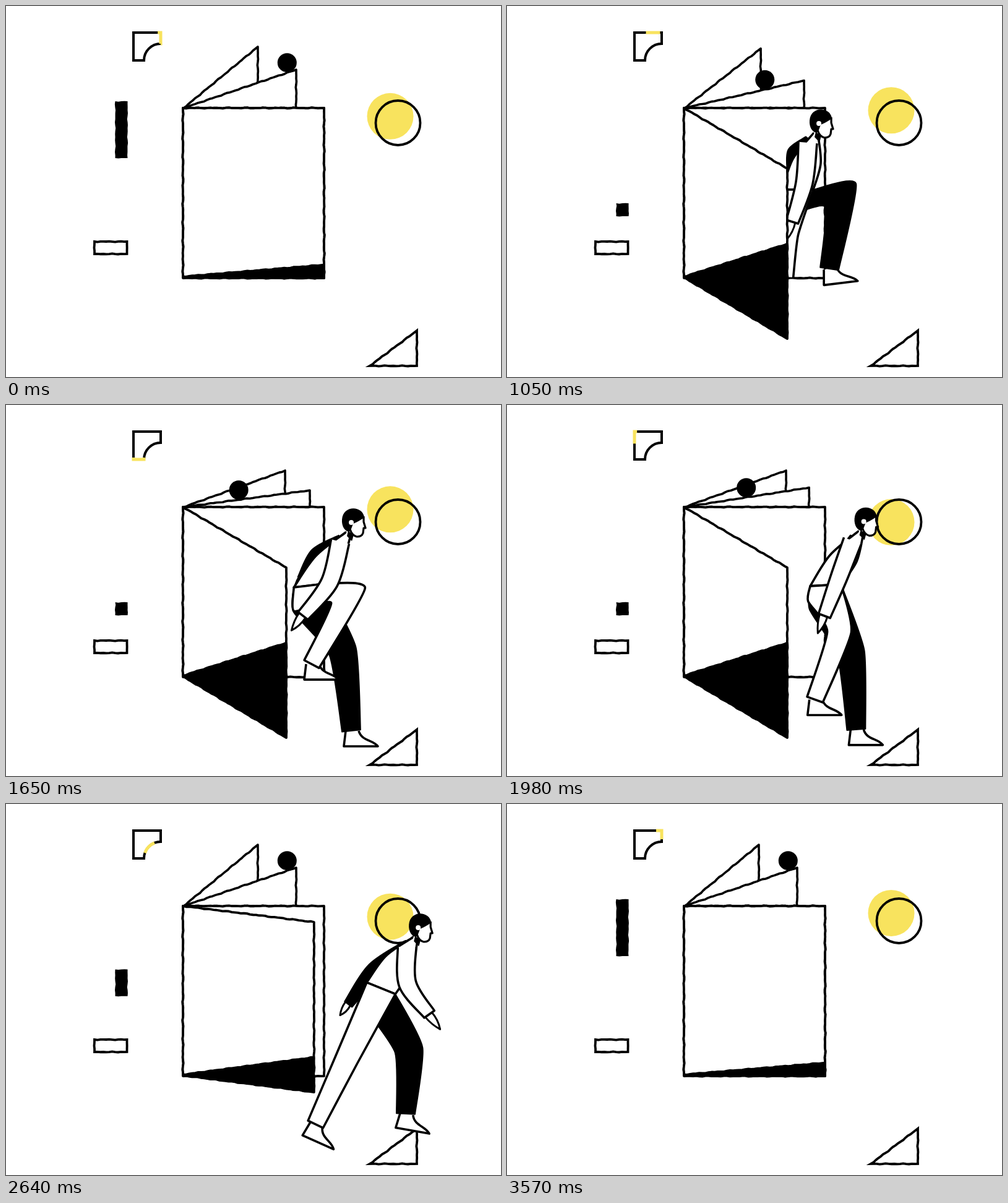
Write an HTML page with a canvas that moves like this. It is 800 px wide and 600 px high and loops after 3600 ms.

```html
<!DOCTYPE html>
<html lang="en">
<head>
<meta charset="utf-8">
<title>Stepping out of a book</title>
<style>
html, body { margin: 0; width: 100%; height: 100%; overflow: hidden; background: #fff; }
canvas { display: block; width: 800px; height: 600px; }
</style>
</head>
<body>
<canvas id="stage" width="800" height="600"></canvas>
<script>
const LOOP = 3600, INK = '#000', PAPER = '#fff', SUN = '#f8e35e', SILL = 441;
const ctx = document.getElementById('stage').getContext('2d');

// Joints of the walker; the near leg is white, the far leg black.
const behindDoor = { hip: [470, 297], nearKnee: [452, 368], nearAnkle: [449, 440] };
const poses = [
  { t: 570, ...behindDoor, neck: [513, 211], nearWrist: [463, 347], nearBend: -5,
    farWrist: [505, 297], farBend: 40, farKnee: [470, 370], farAnkle: [474, 440] },
  { t: 1050, ...behindDoor, neck: [499, 209], nearWrist: [461, 349], nearBend: -7,
    farWrist: [460, 268], farKnee: [539, 306], farAnkle: [521, 425], farPitch: -7 },
  { t: 1650, neck: [553, 209], hip: [490, 292], tilt: -7, nearWrist: [480, 341], nearBend: -14,
    farWrist: [478, 282], nearKnee: [553, 308], nearAnkle: [494, 419],
    farKnee: [544, 398], farAnkle: [558, 527] },
  { t: 2280, neck: [588, 206], hip: [537, 291], nearWrist: [542, 341], nearBend: 12,
    farWrist: [572, 335], nearKnee: [523, 419], nearAnkle: [501, 527],
    farKnee: [566, 404], farAnkle: [570, 523] },
  { t: 2640, neck: [661, 219], hip: [606, 298], tilt: 22, nearWrist: [684, 340], nearBend: 18,
    farWrist: [553, 324], nearKnee: [551, 411], nearAnkle: [500, 518], nearPitch: 24,
    farKnee: [651, 398], farAnkle: [646, 501], farPitch: 10 },
  { t: 2940, neck: [772, 214], hip: [720, 300], tilt: 8, nearWrist: [784, 338], nearBend: 18,
    farWrist: [674, 304], nearKnee: [760, 392], nearAnkle: [702, 488], nearPitch: 15,
    farKnee: [685, 410], farAnkle: [655, 504], farPitch: 5 }
].map(p => ({ tilt: 0, farBend: 8, nearPitch: 0, farPitch: 0, ...p }));

const add = (p, x, y) => [p[0] + x, p[1] + y];
const mix = (a, b, u) => Array.isArray(a) ? a.map((v, i) => mix(v, b[i], u)) : a + (b - a) * u;
const clamp = u => Math.max(0, Math.min(1, u));
const smooth = u => u * u * (3 - 2 * u);
const ramp = (t, from) => smooth(clamp((t - from) / 500));
const swing = (t, out, back) => ramp(t, out) - ramp(t, back);

function moved(pose, t, dx, dy) {
  const out = { ...pose, t };
  for (const k in out) if (Array.isArray(out[k])) out[k] = add(out[k], dx, dy);
  return out;
}
poses.unshift(moved(poses[0], 240, -80, 110));
poses.push(moved(poses[poses.length - 1], 3360, 200, 15));

function poseAt(t) {
  let i = 0;
  while (i < poses.length - 2 && t >= poses[i + 1].t) i++;
  const a = poses[i], b = poses[i + 1], u = clamp((t - a.t) / (b.t - a.t));
  const out = {};
  for (const k in a) out[k] = mix(a[k], b[k], (u + smooth(u)) / 2);
  return out;
}

function paint(fill, stroke, width = 3.6) {
  if (fill) { ctx.fillStyle = fill; ctx.fill(); }
  if (stroke) { ctx.strokeStyle = stroke; ctx.lineWidth = width; ctx.stroke(); }
}

// Polygon with a slightly uneven, hand-inked edge.
function poly(pts, fill, stroke, width) {
  ctx.beginPath();
  pts.forEach((a, i) => {
    const b = pts[(i + 1) % pts.length];
    const len = Math.hypot(b[0] - a[0], b[1] - a[1]), n = Math.ceil(len / 5);
    for (let j = 0; j < n; j++) {
      const [x, y] = mix(a, b, j / n), d = j * 5;
      const off = j ? .35 * (Math.sin(d * .23 + i) + Math.sin(d * .41 + 2 * i)) : 0;
      ctx.lineTo(x - (b[1] - a[1]) / len * off, y + (b[0] - a[0]) / len * off);
    }
  });
  ctx.closePath();
  paint(fill, stroke, width);
}

function disc(x, y, r, fill, stroke, width) {
  ctx.beginPath();
  ctx.arc(x, y, r, 0, 7);
  paint(fill, stroke, width);
}

// Adds a smooth run through the points to the current path.
function spline(pts, k) {
  const at = i => pts[Math.max(0, Math.min(pts.length - 1, i))];
  ctx.lineTo(...pts[0]);
  for (let i = 0; i < pts.length - 1; i++) {
    const a = at(i - 1), b = at(i), c = at(i + 1), d = at(i + 2);
    ctx.bezierCurveTo(b[0] + (c[0] - a[0]) * k, b[1] + (c[1] - a[1]) * k,
      c[0] - (d[0] - b[0]) * k, c[1] - (d[1] - b[1]) * k, ...c);
  }
}

function normal(a, b) {
  const dx = b[0] - a[0], dy = b[1] - a[1], len = Math.hypot(dx, dy) || 1;
  return [-dy / len, dx / len];
}

function bow(a, b, amount) {
  const n = normal(a, b);
  return add(mix(a, b, .5), n[0] * amount, n[1] * amount);
}

// Back and front edges of a jointed, tapered limb.
function edges([a, b, c], widths) {
  const n1 = normal(a, b), n2 = normal(b, c);
  const k = 1 / Math.max(.35, 1 + n1[0] * n2[0] + n1[1] * n2[1]);
  const offs = [n1, [(n1[0] + n2[0]) * k, (n1[1] + n2[1]) * k], n2];
  const side = s => [a, b, c].map((p, i) =>
    add(p, s * offs[i][0] * widths[i] / 2, s * offs[i][1] * widths[i] / 2));
  return [side(1), side(-1)];
}

function outline(back, front, k, fill, closed = true) {
  ctx.beginPath();
  spline(back, k);
  spline([...front].reverse(), k);
  if (closed) ctx.closePath();
  paint(fill, INK, fill === INK ? 2 : 3.6);
}

function drawFoot([x, y], pitch) {
  ctx.save();
  ctx.translate(x, y);
  ctx.rotate(pitch * Math.PI / 180);
  ctx.beginPath();
  ctx.moveTo(-9, 0);
  ctx.lineTo(-12, 25);
  ctx.lineTo(43, 25);
  ctx.bezierCurveTo(35, 14, 17, 17, 12, 0);
  paint(PAPER, INK);
  ctx.restore();
}

function drawLeg(knee, ankle, pitch, waist, widths, fill, hidden) {
  const hip = mix(...waist, .5), n = normal(hip, knee);
  const [back, front] = edges([hip, knee, ankle], widths);
  back[0] = waist[0];
  front[0] = waist[1];
  // A raised thigh shows the seat below it.
  const lift = 33 * clamp(n[1]);
  back.splice(1, 0, add(mix(back[0], back[1], .3), n[0] * lift - lift * .3, n[1] * lift));
  ctx.save();
  if (hidden) {
    ctx.beginPath();
    ctx.rect(0, 0, 800, SILL);
    ctx.clip();
  }
  drawFoot(ankle, pitch);
  outline(back, front, .1, fill);
  ctx.restore();
}

function drawArm(shoulder, wrist, bend, widths, fill, reach) {
  const elbow = bow(shoulder, wrist, bend), n = normal(elbow, wrist);
  const [back, front] = edges([shoulder, elbow, wrist], widths);
  const root = mix(back[2], front[2], .75), end = mix(back[2], front[2], .1);
  const tip = add(wrist, n[1] * reach, -n[0] * reach);
  const bulge = bow(root, tip, -4), palm = bow(end, tip, 3);
  ctx.beginPath();
  ctx.moveTo(...root);
  ctx.quadraticCurveTo(...bulge, ...tip);
  ctx.quadraticCurveTo(...palm, ...end);
  paint(PAPER, INK, 3);
  outline(back, front, 1 / 6, fill, fill === INK);
}

function drawHead(neck) {
  const [x, y] = add(neck, 8, -24);
  ctx.save();
  ctx.translate(x, y);
  poly([[-8, 14], [-12, 24], [-4, 30], [4, 24]], PAPER);
  poly([[-8, 18], [1, 25], [-2, 35], [-10, 27]], INK);
  ctx.beginPath();
  ctx.moveTo(17, -5);
  ctx.lineTo(17, 4);
  ctx.lineTo(20, 14);
  ctx.lineTo(17, 14);
  ctx.lineTo(16, 22);
  ctx.quadraticCurveTo(14, 28, 6, 28);
  ctx.quadraticCurveTo(-2, 26, -5, 16);
  ctx.lineTo(0, 2);
  paint(PAPER, INK, 3.2);
  ctx.beginPath();
  ctx.moveTo(18, -3);
  ctx.bezierCurveTo(16, -22, -16, -24, -18, 0);
  ctx.bezierCurveTo(-19, 11, -13, 20, -6, 20);
  ctx.lineTo(0, 7);
  ctx.quadraticCurveTo(8, 4, 18, -3);
  paint(INK);
  disc(-3, 5, 4, PAPER);
  ctx.restore();
}

function drawPerson(t) {
  if (t < poses[0].t || t >= 3360) return;
  const p = poseAt(t), tilt = p.tilt * Math.PI / 180;
  const wx = 25 * Math.cos(tilt), wy = 25 * Math.sin(tilt);
  const waist = [add(p.hip, -wx, -wy), add(p.hip, wx, wy)];
  const nape = add(p.neck, -4, -3), throat = add(p.neck, 4, 2);
  drawArm(add(p.neck, -13, 5), p.farWrist, p.farBend, [8, 24, 15], INK, 22);
  outline([nape, bow(nape, waist[0], 9), waist[0]],
    [throat, bow(throat, waist[1], -8), waist[1]], 1 / 6, PAPER);
  drawLeg(p.farKnee, p.farAnkle, p.farPitch, waist, [50, 44, 30], INK, t < 600);
  drawLeg(p.nearKnee, p.nearAnkle, p.nearPitch, waist, [50, 37, 27], PAPER, t < 1650);
  drawArm(add(p.neck, -13, 12), p.nearWrist, p.nearBend, [30, 27, 20], PAPER, 30);
  drawHead(p.neck);
}

function drawPages(t) {
  const hinge = [287, 165], fall = swing(t, 800, 1870);
  const page = tip => poly([hinge, tip, [tip[0], 165]], PAPER, INK);
  const low = mix([469, 103], [491, 138], fall);
  page(mix([407, 66], [451, 106], swing(t, 970, 2030)));
  page(low);
  const a = Math.atan2(165 - low[1], low[0] - 287), c = Math.cos(a), s = Math.sin(a);
  const d = mix(182, 92, fall), r = 15.5;
  disc(287 + d * c - r * s, 165 - d * s - r * c, r, INK);
}

function drawDoor(open) {
  const x = mix(514, 453, open), foot = [x, mix(440, 538, open)];
  poly([[286, 165], [x, mix(165, 263, open)], foot, [286, 439]], PAPER, INK, 3.8);
  poly([[286, 437], [x, mix(418, 384, open)], foot, [286, 439]], INK, INK, 2.5);
}

// Corner outline with a light running around it three times per loop.
function drawBracket(t) {
  const len = 123 + 13.5 * Math.PI, dash = 23;
  ctx.beginPath();
  ctx.moveTo(206, 43);
  ctx.lineTo(250, 43);
  ctx.lineTo(250, 61);
  ctx.arc(250, 88, 27, -Math.PI / 2, Math.PI, true);
  ctx.lineTo(206, 88);
  ctx.closePath();
  paint(null, INK, 4);
  ctx.setLineDash([dash, len - dash]);
  ctx.lineDashOffset = -(39 + 3 * len * t / LOOP);
  paint(null, SUN, 5);
  ctx.setLineDash([]);
}

const box = (x, y, w, h) => [[x, y], [x + w, y], [x + w, y + h], [x, y + h]];

function draw(t) {
  ctx.fillStyle = PAPER;
  ctx.fillRect(0, 0, 800, 600);
  ctx.lineJoin = 'miter';
  drawBracket(t);
  const bar = swing(t, 40, 2455);
  poly(box(176.5, mix(154, 319, bar), 20, mix(92, 21, bar)), INK);
  poly(box(143, 381, 52.5, 20), null, INK, 3.8);
  disc(621, 178.3 + 19 * Math.sin(t / 1800 * 2 * Math.PI), 37.5, SUN);
  disc(633.5, 189, 36, null, INK, 3.8);
  poly([[588, 582], [664, 525], [664, 582]], null, INK, 3.8);
  ctx.lineJoin = 'round';
  drawPages(t);
  poly(box(286, 165, 228, 275), PAPER, INK, 3.8);
  drawPerson(t);
  drawDoor(swing(t, 40, 2310));
}

const start = performance.now();
function tick(now) {
  draw(Math.max(0, now - start) % LOOP);
  requestAnimationFrame(tick);
}
draw(0);
requestAnimationFrame(tick);
</script>
</body>
</html>
```
